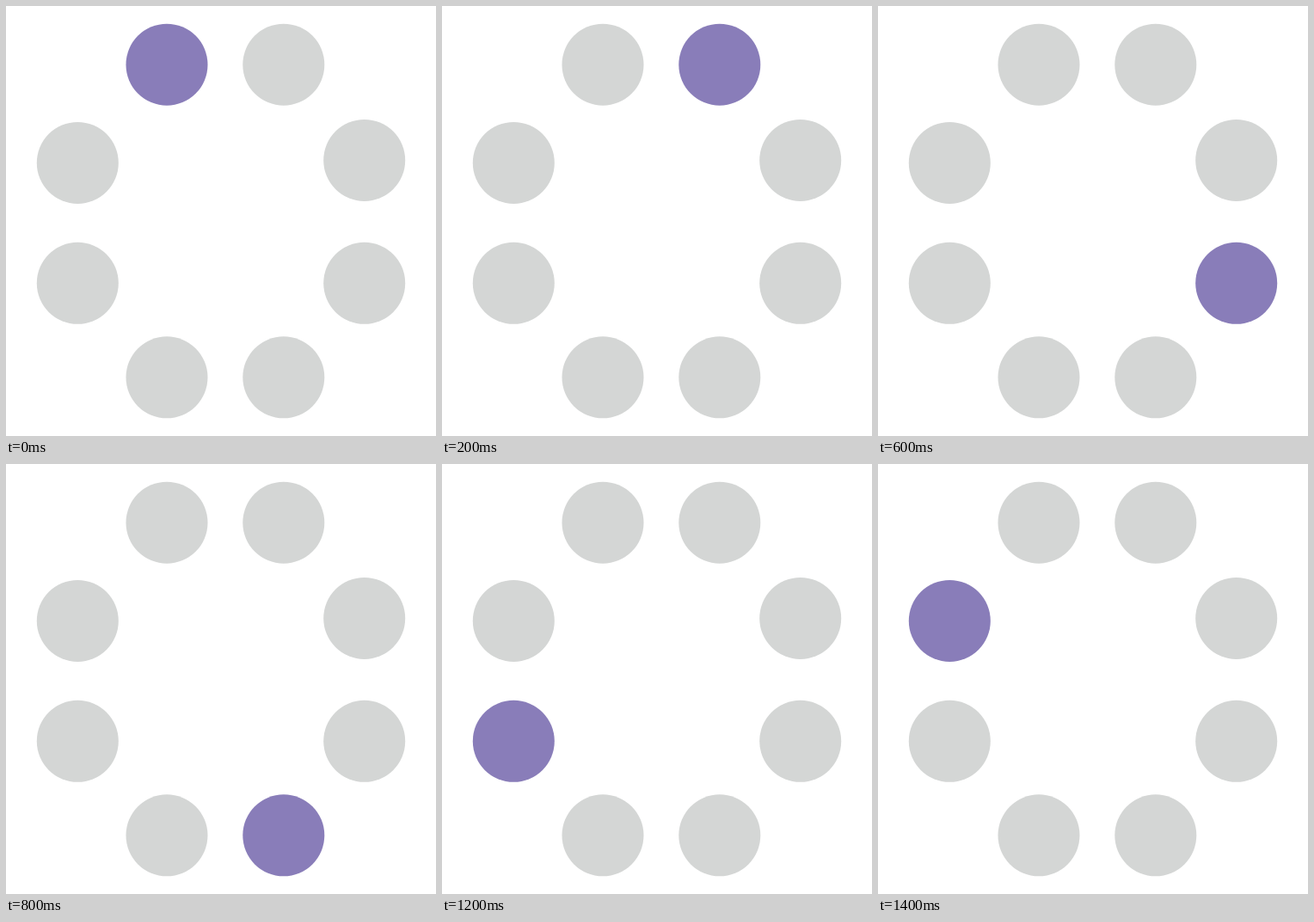
An HTML page for the animation above (1600 ms loop, 500 by 500 pixels).

```html
<!DOCTYPE html>
<html lang="en">
<head>
<meta charset="utf-8">
<title>Loading dots</title>
<style>
  html, body { margin: 0; width: 100%; height: 100%; overflow: hidden; background: #fff; }
  svg { display: block; width: 100%; height: 100%; }
  circle {
    r: 47.5px;
    fill: #d4d6d5;
    animation: light 1600ms step-end infinite;
    animation-delay: calc((var(--i) - 8) * 200ms);
  }
  @keyframes light {
    0% { fill: #897db9; }
    12.5%, 100% { fill: #d4d6d5; }
  }
</style>
</head>
<body>
<svg viewBox="0 0 500 500">
  <circle style="--i:0" cx="187" cy="68.2" r="47.5"/>
  <circle style="--i:1" cx="322.8" cy="68.2" r="47.5"/>
  <circle style="--i:2" cx="416.7" cy="179.4" r="47.5"/>
  <circle style="--i:3" cx="416.7" cy="322.3" r="47.5"/>
  <circle style="--i:4" cx="322.8" cy="431.8" r="47.5"/>
  <circle style="--i:5" cx="187" cy="431.8" r="47.5"/>
  <circle style="--i:6" cx="83.3" cy="322.3" r="47.5"/>
  <circle style="--i:7" cx="83.3" cy="182.4" r="47.5"/>
</svg>
</body>
</html>
```
